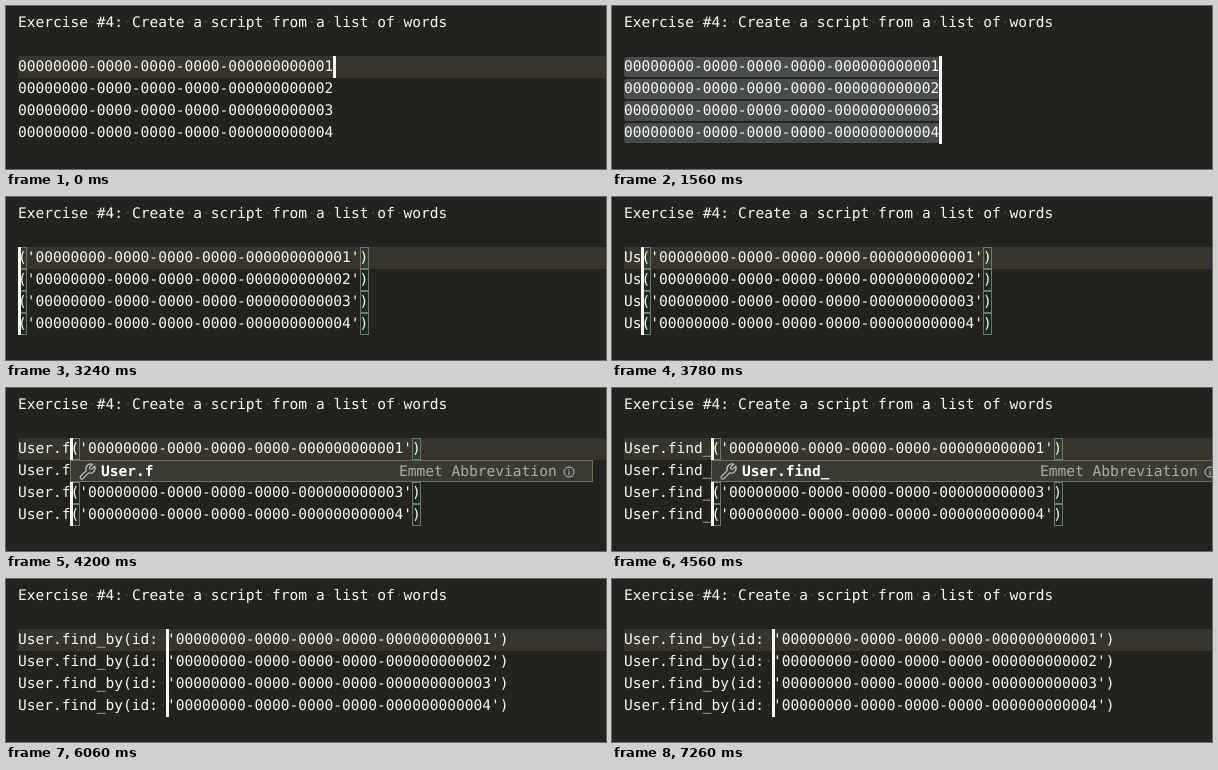
Animation, 600 px wide and 163 px high, one loop 7440 ms. Source, as an HTML page:

```html
<!DOCTYPE html>
<html lang="en">
<head>
<meta charset="utf-8">
<title>Multi-cursor editing</title>
<style>
  html, body { margin: 0; width: 100%; height: 100%; overflow: hidden; background: #22221e; }
  #stage {
    position: relative; width: 600px; height: 163px; overflow: hidden; color: #f8f8f2;
    font: 14.56px/22px "DejaVu Sans Mono", monospace;
    text-rendering: geometricPrecision;
  }
  #stage div { position: absolute; top: 0; left: 0; }
  i { font-style: normal; color: #45453e; }
  .line, #popup div { white-space: pre; }
  .line { height: 22px; }
  #stage #active { left: 12px; top: 50px; width: 588px; height: 22px; background: #36342b; }
  .sel { height: 20px; background: #494c4c; border-radius: 3px; }
  .match { height: 22px; width: 9px; box-sizing: border-box; border: 1px solid #6d7a70; background: #0064001a; }
  .caret { width: 2.5px; height: 22px; background: #f8f8f0; }
  #stage #popup {
    top: 72px; width: 523px; height: 22px; box-sizing: border-box;
    background: #3a3b33; border: 1px solid #716e5c; line-height: 22px;
  }
  #popup svg { position: absolute; fill: none; stroke: #c5c5c0; }
  #stage #label { left: 30px; font-weight: bold; color: #fff; }
  #stage #kind { left: 328px; color: #aeada4; }
</style>
</head>
<body>
<div id="stage">
  <div id="active"></div>
  <div id="code"></div>
  <div id="popup">
    <svg style="left:7px;top:1px" width="19" height="19" viewBox="0 0 16 16" stroke-width="1">
      <path d="M14.1 3.6L11.6 6.1 9.9 5.9 9.7 4.4 12.2 1.9A4.2 4.2 0 0 0 6.9 7.3L2.2 12A1.4 1.4 0 0 0 4.2 14L8.9 9.2A4.2 4.2 0 0 0 14.1 3.6Z"/>
    </svg>
    <div id="label"></div>
    <div id="kind">Emmet Abbreviation</div>
    <svg style="left:492px;top:5px" width="12" height="12" viewBox="0 0 12 12">
      <circle cx="6" cy="6" r="5"/><path d="M6 5v4M6 3v1.2"/>
    </svg>
  </div>
</div>
<script>
const LOOP = 7440, BLINK = 300, LEFT = 12, CHAR = 8.766, ROW = 22, TOP = 6, ID_LENGTH = 36;
const TITLE = 'Exercise #4: Create a script from a list of words';
const el = id => document.getElementById(id);
const colX = col => LEFT + col * CHAR;
const rowY = row => TOP + row * ROW;
const caretX = col => Math.max(LEFT, Math.round(colX(col) - 0.9));
const dots = text => text.replace(/ /g, '<i>·</i>');

// Each step is an edit; "rest" delays the start of the caret's blinking.
const steps = [];
const step = (t, change) =>
  steps.push({ t, head: '', tail: '', col: 0, carets: 4, sel: false, word: '', rest: 0, ...change });

step(-180, { col: ID_LENGTH, carets: 1 });
step(360, { col: ID_LENGTH, carets: 1 });
[600, 840, 1020, 1200].forEach((t, i) => step(t, { carets: i + 1 }));
step(1500, { sel: true, col: 36, rest: 60 });
step(2100, { sel: true, head: '(', tail: ')', col: 37, rest: 60 });
step(2400, { sel: true, head: "('", tail: "')", col: 38, rest: 180 });
step(3180, { head: "('", tail: "')", rest: 60 });

const method = 'User.find_by';
[3720, 3780, 3900, 3960, 4080, 4200, 4260, 4320, 4440, 4500, 4620, 4800].forEach((t, i) => {
  const typed = method.slice(0, i + 1);
  step(t, { head: typed + "('", tail: "')", col: i + 1, word: i > 4 ? typed : '', rest: i === 11 ? 60 : 0 });
});
[5100, 5400, 5580, 5880, 6060].forEach((t, i) => {
  const arg = 'id: '.slice(0, i);
  step(t, {
    head: `${method}(${arg}'`, tail: "')", col: method.length + 1 + i,
    word: i === 1 || i === 2 ? arg : ''
  });
});

function box(cls, x, y, extra = '', text = '') {
  return `<div class="${cls}" style="left:${x}px;top:${y}px;${extra}">${text}</div>`;
}

function render(s, caretOn) {
  const open = s.head.indexOf('(');
  const close = s.head.length + ID_LENGTH + s.tail.length - 1;
  const matched = !s.sel && open >= 0 && (s.col === open || s.col === open + 1);
  let html = box('line', LEFT, rowY(0), '', dots(TITLE));
  for (let n = 1; n <= 4; n++) {
    const y = rowY(n + 1);
    const text = `${s.head}00000000-0000-0000-0000-00000000000${n}${s.tail}`;
    if (s.sel) html += box('sel', colX(s.head.length), y + 1, `width:${ID_LENGTH * CHAR}px`);
    if (matched) for (const col of [open, close]) html += box('match', Math.round(colX(col)), y);
    html += box('line', LEFT, y, '', dots(text));
    if (caretOn && n <= s.carets) html += box('caret', caretX(s.col), y);
  }
  el('code').innerHTML = html;
  el('active').hidden = s.sel;
  el('popup').hidden = !s.word;
  el('popup').style.left = caretX(s.col) + 'px';
  el('label').textContent = s.word;
}

const start = performance.now();
let shown = '';
function draw() {
  const t = (performance.now() - start) % LOOP;
  const index = steps.findLastIndex(s => s.t <= t);
  const s = steps[index];
  const idle = Math.max(0, t - s.t - s.rest);
  const caretOn = Math.floor(idle / BLINK) % 2 === 0;
  const key = index + ':' + caretOn;
  if (key !== shown) render(s, caretOn);
  shown = key;
  requestAnimationFrame(draw);
}
draw();
</script>
</body>
</html>
```
